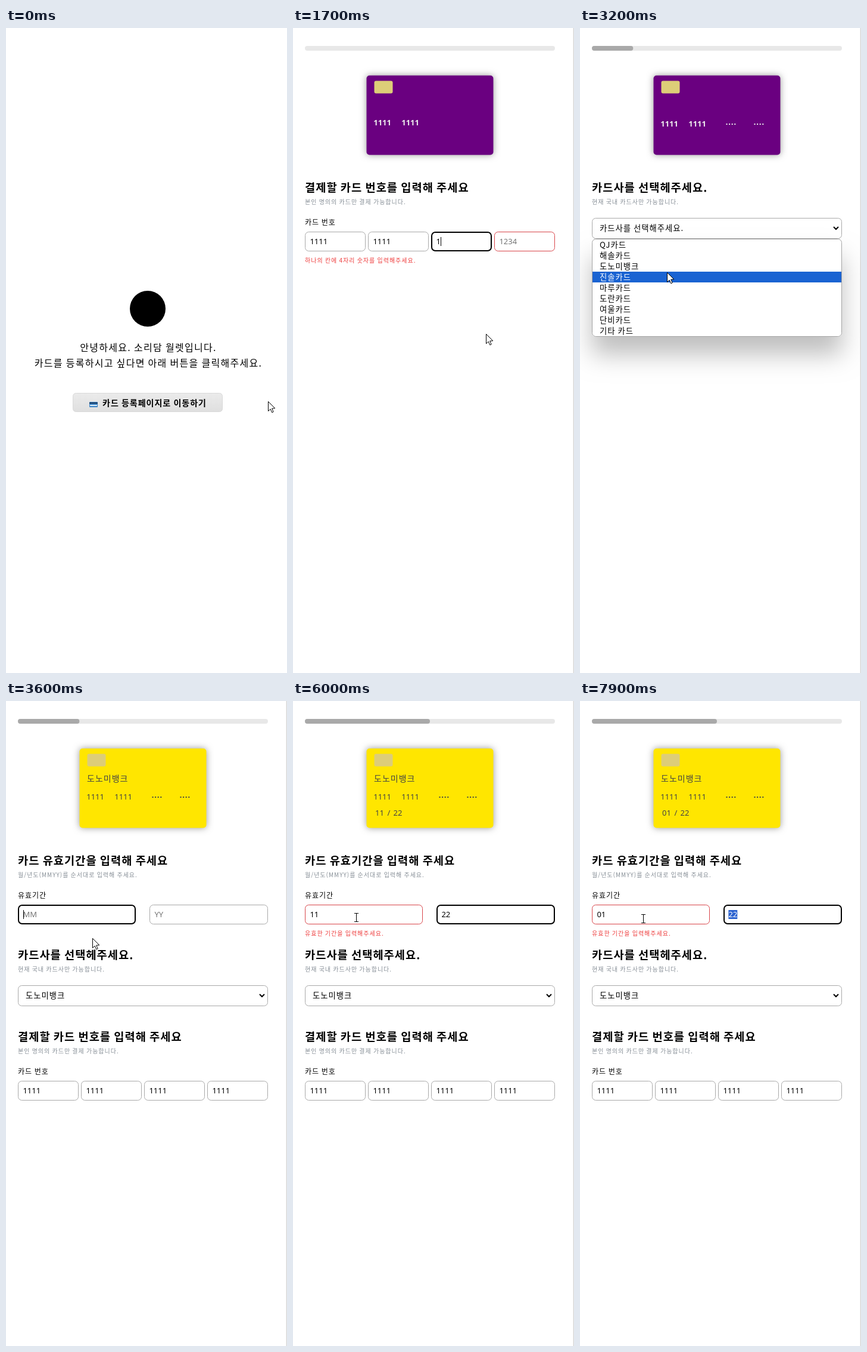
Write an HTML page with a canvas that moves like this. It is 472x1080 px and loops after 8 s.

```html
<!DOCTYPE html>
<html lang="ko">
<head>
<meta charset="utf-8">
<title>카드 등록</title>
<style>
  html, body { margin: 0; width: 100%; height: 100%; overflow: hidden; background: #fff; }
  canvas { display: block; }
</style>
</head>
<body>
<canvas id="stage" width="472" height="1080"></canvas>
<script>
const ctx = document.getElementById('stage').getContext('2d');
const LOOP = 8000;
const KOREAN = '"Noto Sans CJK KR", "Noto Sans CJK JP", "Noto Sans CJK", sans-serif';
const LATIN = '"Noto Sans", "Open Sans", ' + KOREAN;
const DIGIT_SIZE = 13;
const RED = '#d8454a', GRAY = '#a9a9a9', HINT = '#757575', BLUE = '#1a63d2';
const BANK = '도노미뱅크';
const PICK = '카드사를 선택해주세요.';
const BANKS = ['QJ카드', '해솔카드', BANK, '진솔카드', '마루카드', '도란카드', '여울카드', '단비카드', '기타 카드'];

// Moments of the session, in ms
const OPEN_FORM = 500, FIRST_DIGIT = 900, DIGIT_GAP = 100;
const NUMBER_DONE = FIRST_DIGIT + 15 * DIGIT_GAP;
const OPEN_LIST = 3000, BANK_DONE = 3500;
const MONTH = [[3500, ''], [4100, '1'], [4200, '11'], [7000, '1'], [7100, ''], [7300, '0'], [7500, '01']];
const YEAR = [[3500, ''], [4700, '2'], [4900, '22']];
const MONTH_DONE = 4200, YEAR_DONE = 4900, EDIT_MONTH = 6800, EDIT_DONE = 7500;

// Progress gained at each finished step, as a share of the bar
const STEPS = [[NUMBER_DONE, 0.165], [BANK_DONE, 0.165], [YEAR_DONE, 0.17]];

// Pointer stops: time, x, y
const POINTER = [
  [0, 440, 625], [450, 345, 627], [600, 345, 627], [900, 364, 505], [1200, 324, 512],
  [2450, 324, 512], [2800, 154, 341], [3000, 154, 341], [3160, 146, 409], [3280, 146, 409],
  [3400, 145, 397], [3600, 145, 397], [4300, 143, 410], [5550, 143, 410], [5950, 106, 362],
  [7000, 106, 362], [7100, 106, 364]
];

const clamp = p => Math.max(0, Math.min(1, p));
const valueAt = (steps, t) => steps.reduce((v, [at, next]) => t >= at ? next : v, '');
const blink = (t, since) => (t - since) % 1060 < 530;

function pointerAt(t) {
  const i = POINTER.findIndex(k => k[0] > t);
  if (i < 0) return POINTER[POINTER.length - 1].slice(1);
  const [ta, xa, ya] = POINTER[i - 1], [tb, xb, yb] = POINTER[i];
  const p = (t - ta) / (tb - ta), e = p * p * (3 - 2 * p);
  return [xa + (xb - xa) * e, ya + (yb - ya) * e];
}

// Text is placed by its left edge and its vertical middle
function text(str, x, y, size, o = {}) {
  ctx.font = `${o.weight || 400} ${size}px ${o.family || KOREAN}`;
  ctx.letterSpacing = (o.gap ?? 1) + 'px';
  ctx.textAlign = o.align || 'left';
  ctx.fillStyle = o.color || '#000';
  ctx.fillText(str, x, y + size * 0.375);
}

function digits(str, x, y, color = '#000', weight = 400) {
  text(str, x, y, DIGIT_SIZE, { family: LATIN, gap: 0, color, weight });
}

function box(x, y, w, h, r, fill, stroke, line = 1) {
  ctx.beginPath();
  const d = stroke ? line / 2 : 0;
  ctx.roundRect(x + d, y + d, w - 2 * d, h - 2 * d, r);
  if (fill) { ctx.fillStyle = fill; ctx.fill(); }
  if (stroke) { ctx.strokeStyle = stroke; ctx.lineWidth = line; ctx.stroke(); }
}

function shadowBox(x, y, w, h, r, fill, drop, blur, alpha) {
  ctx.save();
  ctx.shadowColor = `rgba(0,0,0,${alpha})`;
  ctx.shadowOffsetY = drop;
  ctx.shadowBlur = blur;
  box(x, y, w, h, r, fill);
  ctx.restore();
}

// caret: index of the character it stands before, or -1
function field(x, y, w, value, hint, { focus, error, caret = -1, selected } = {}) {
  box(x, y, w, 33, 6, '#fff', focus ? '#000' : error ? RED : GRAY, focus ? 2 : 1);
  const left = x + 8.4, mid = y + 16;
  ctx.font = `400 ${DIGIT_SIZE}px ${LATIN}`;
  ctx.letterSpacing = '0px';
  const width = n => ctx.measureText(value.slice(0, n)).width;
  const at = left + width(Math.max(caret, 0));
  if (selected) {
    ctx.fillStyle = '#2b62d0';
    ctx.fillRect(left, y + 9, width(value.length), 15);
  }
  digits(value || hint, left, mid, selected ? '#fff' : value ? '#000' : HINT);
  if (caret >= 0) {
    ctx.fillStyle = '#000';
    ctx.fillRect(Math.ceil(at), y + 9, 1, 15);
  }
}

function heading(title, note, dy) {
  text(title, 20, 267 + dy, 18.7, { weight: 700 });
  text(note, 20, 291 + dy, 10, { color: '#868e96' });
}

function label(str, dy) { text(str, 20, 325 + dy, 12); }
function warning(str, dy) { text(str, 20, 389 + dy, 10, { color: '#ee3b3b' }); }

function welcome() {
  ctx.fillStyle = '#000';
  ctx.beginPath();
  ctx.arc(238, 470, 30, 0, Math.PI * 2);
  ctx.fill();
  const line = { align: 'center', gap: 1.3 };
  text('안녕하세요. 소리담 월렛입니다.', 239, 535, 16, line);
  text('카드를 등록하시고 싶다면 아래 버튼을 클릭해주세요.', 239, 561, 16, line);

  const shade = ctx.createLinearGradient(0, 611, 0, 643);
  shade.addColorStop(0, '#ebebeb');
  shade.addColorStop(1, '#dfdfdf');
  box(112, 611, 252, 32, 5, shade, '#d9d9d9');
  box(140, 626, 14, 9, 1, '#3b82c4');
  ctx.fillStyle = '#1d3f66';
  ctx.fillRect(140, 627, 14, 2);
  ctx.fillStyle = '#d8ebf8';
  ctx.fillRect(141, 631, 12, 2);
  text('카드 등록페이지로 이동하기', 162, 627.5, 14, { weight: 700 });
}

function progress(t) {
  const w = 420 * STEPS.reduce((sum, [at, share]) =>
    sum + share * (1 - (1 - clamp((t - at) / 500)) ** 3), 0);
  box(20, 30, 420, 8, 4, '#e8e8e8');
  if (w > 0) box(20, 30, w, 8, Math.min(4, w / 2), '#a9a9a9');
}

function card(t, typed, month, year) {
  const yellow = t >= BANK_DONE;
  const ink = yellow ? '#444' : '#eee', weight = yellow ? 400 : 600;
  shadowBox(123.5, 79.5, 213, 133, 5, yellow ? '#ffe600' : '#6a0080', 0, 12, 0.4);
  box(136.5, 88.5, 31, 21, 3, '#ddcd78');
  if (yellow) text(BANK, 136, 130, 14, { color: ink });

  const y = typed > 8 ? 160.5 : 158.5;
  [136, 183, 245.5, 292.5].forEach((x, i) => {
    const n = Math.max(0, Math.min(4, typed - i * 4));
    if (i < 2) return digits('1'.repeat(n), x - 0.8, y, ink, weight);
    ctx.fillStyle = ink;
    for (let k = 0; k < n; k++) ctx.fillRect(x + k * 4.6, 160, 2, 2);
  });

  digits(month, 138, 187, ink);
  if (year) {
    digits('/', 158.5, 187, ink);
    digits(year, 168.5, 187, ink);
  }
}

function numberSection(t, typed, dy) {
  const typing = t < NUMBER_DONE;
  const active = typing ? Math.min(3, Math.floor(typed / 4)) : -1;
  const last = typed ? FIRST_DIGIT + (typed - 1) * DIGIT_GAP : OPEN_FORM;
  heading('결제할 카드 번호를 입력해 주세요', '본인 명의의 카드만 결제 가능합니다.', dy);
  label('카드 번호', dy);
  for (let i = 0; i < 4; i++) {
    const n = Math.max(0, Math.min(4, typed - i * 4));
    const focus = i === active;
    field(20 + i * 106, 341 + dy, 102, '1'.repeat(n), '1234', {
      focus,
      error: typing && typed > 0 && n < 4,
      caret: focus && blink(t, last) ? n : -1
    });
  }
  if (typing && typed > 0) warning('하나의 칸에 4자리 숫자를 입력해주세요.', dy);
}

function bankSection(t, dy) {
  const focus = t < OPEN_LIST;
  heading('카드사를 선택헤주세요.', '현재 국내 카드사만 가능합니다.', dy);
  box(20, 318 + dy, 420, 35, 6, '#fff', focus ? '#000' : GRAY, focus ? 2 : 1);
  text(t < BANK_DONE ? PICK : BANK, 33, 335 + dy, 13.33);
  ctx.strokeStyle = '#000';
  ctx.lineWidth = 2;
  ctx.beginPath();
  ctx.moveTo(426, 333 + dy);
  ctx.lineTo(430, 337 + dy);
  ctx.lineTo(434, 333 + dy);
  ctx.stroke();
}

function bankList(y) {
  shadowBox(20, 353, 420, 164, 6, '#fff', 30, 40, 0.25);
  box(20, 353, 420, 164, 6, '#fff', '#a5a5a5');
  const hover = Math.floor((y - 354) / 18);
  BANKS.forEach((name, i) => {
    if (i === hover) {
      ctx.fillStyle = BLUE;
      ctx.fillRect(21, 354 + i * 18, 418, 18);
    }
    text(name, 33, 363 + i * 18, 13.33, { color: i === hover ? '#fff' : '#000' });
  });
}

function yearCaret(t, year) {
  if (t < YEAR_DONE) return blink(t, year ? 4700 : MONTH_DONE) ? year.length : -1;
  if (t < 5560) return 2;
  return t >= 6150 && t < 6560 ? 1 : -1;
}

function expirySection(t, month, year) {
  const onMonth = t < MONTH_DONE || (t >= EDIT_MONTH && t < EDIT_DONE);
  const failed = t >= MONTH[1][0];
  const monthTime = MONTH.reduce((m, [at]) => t >= at ? at : m, 0);
  heading('카드 유효기간을 입력해 주세요', '월/년도(MMYY)를 순서대로 입력해 주세요.', 0);
  label('유효기간', 0);
  field(20, 341, 198, month, 'MM', {
    focus: onMonth,
    error: failed,
    caret: onMonth && blink(t, Math.max(monthTime, t >= EDIT_MONTH ? EDIT_MONTH : 0)) ? month.length : -1
  });
  field(241, 341, 199, year, 'YY', {
    focus: !onMonth,
    error: failed,
    caret: onMonth || t >= EDIT_DONE ? -1 : yearCaret(t, year),
    selected: t >= EDIT_DONE
  });
  if (failed) warning('유효한 기간을 입력해주세요.', 0);
}

function arrow(x, y) {
  ctx.save();
  ctx.translate(Math.round(x) + 0.5, Math.round(y) + 0.5);
  ctx.beginPath();
  [[0, 0], [0, 16], [3.7, 12.6], [6.3, 18.3], [8.7, 17.2], [6.2, 11.6], [11.3, 11.3]]
    .forEach(p => ctx.lineTo(...p));
  ctx.closePath();
  ctx.fillStyle = '#fff';
  ctx.fill();
  ctx.strokeStyle = '#000';
  ctx.lineWidth = 1;
  ctx.stroke();
  ctx.restore();
}

function beam(x, y) {
  x = Math.round(x);
  y = Math.round(y);
  ctx.fillStyle = '#000';
  ctx.fillRect(x, y - 7, 1, 15);
  for (const end of [y - 7, y + 7]) {
    ctx.fillRect(x - 3, end, 3, 1);
    ctx.fillRect(x + 1, end, 3, 1);
  }
}

function form(t, y) {
  const typedAt = at => Math.max(0, Math.min(16, Math.floor((at - FIRST_DIGIT) / DIGIT_GAP) + 1));
  const typed = typedAt(t);
  const month = valueAt(MONTH, t), year = valueAt(YEAR, t);
  ctx.fillStyle = '#f0f0f0';
  ctx.fillRect(470, 0, 1, 1080);
  ctx.fillStyle = '#d6d6d6';
  ctx.fillRect(471, 0, 1, 1080);
  progress(t);
  card(t, typedAt(t - DIGIT_GAP), month, year);
  if (t < NUMBER_DONE) {
    numberSection(t, typed, 0);
  } else if (t < BANK_DONE) {
    bankSection(t, 0);
    numberSection(t, typed, 137);
    if (t >= OPEN_LIST) bankList(y);
  } else {
    expirySection(t, month, year);
    bankSection(t, 158);
    numberSection(t, typed, 295);
  }
}

function draw(t) {
  const [x, y] = pointerAt(t);
  ctx.fillStyle = '#fff';
  ctx.fillRect(0, 0, 472, 1080);
  if (t < OPEN_FORM) welcome();
  else form(t, y);
  if (t > 5600 && y < 375) beam(x, y);
  else arrow(x, y);
}

const start = performance.now();
function tick() {
  draw((performance.now() - start) % LOOP);
  requestAnimationFrame(tick);
}
tick();
</script>
</body>
</html>
```
